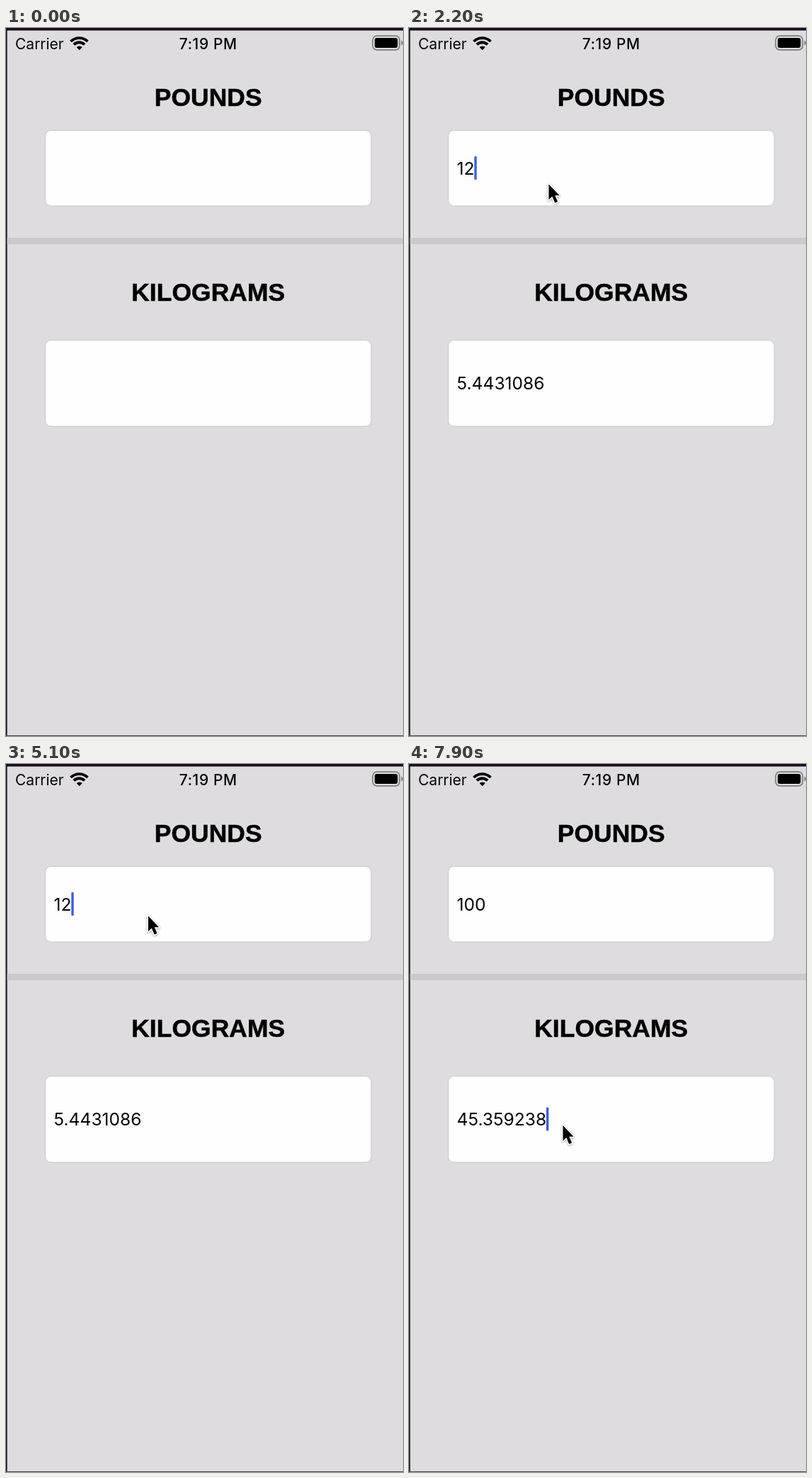
Animation, 561 px wide and 999 px high, one loop 8000 ms. Source, as an HTML page:

```html
<!DOCTYPE html>
<html lang="en">
<head>
<meta charset="utf-8">
<title>Weight converter</title>
<style>
  html, body { margin: 0; width: 100%; height: 100%; overflow: hidden; background: #dedcdf; }
  svg { display: block; width: 100vw; height: 100vh; }
  text { font-family: Inter, Roboto, sans-serif; fill: #050505; }
  .status { font-size: 21px; }
  .clock { font-weight: 500; letter-spacing: .6px; text-anchor: middle; }
  .title { font: bold 35.5px "Liberation Sans", Arial, sans-serif; text-anchor: middle; fill: #000; stroke: #000; stroke-width: .5; }
  .value { font-size: 24.6px; }
  .field { fill: #fffeff; stroke: #c9c7cb; stroke-width: 1; }
  #pointer { filter: drop-shadow(0 1.5px 1.5px rgba(0, 0, 0, .35)); }
</style>
</head>
<body>
<svg viewBox="0 0 561 999">
  <rect width="561" height="999" fill="#dedcdf"/>
  <rect width="561" height="3.5" fill="#17101b"/>
  <rect width="1.6" height="999" fill="#17101b"/>
  <rect y="998" width="561" height="1" fill="#4b484d"/>

  <text class="status" x="13" y="29.5">Carrier</text>
  <g fill="none" stroke="#000" stroke-width="3.8">
    <path d="M91.5 19A17 17 0 0 1 115.5 19M95.9 23.4A10.8 10.8 0 0 1 111.1 23.4"/>
    <path d="M103.7 31.2L99.6 27.1A5.8 5.8 0 0 1 107.8 27.1Z" fill="#000" stroke="none"/>
  </g>
  <text class="status clock" x="285.8" y="29.5">7:19 PM</text>
  <rect x="518.2" y="11.2" width="38" height="19.6" rx="5.5" fill="none" stroke="#807e81" stroke-width="1.7"/>
  <rect x="521" y="14" width="32.4" height="14" rx="3" fill="#000"/>
  <path d="M558.5 17.5Q561 18.5 561 21T558.5 24.5Z" fill="#807e81"/>

  <text class="title" x="285.7" y="109.5">POUNDS</text>
  <rect class="field" x="55.5" y="144.5" width="460.5" height="106.5" rx="8"/>
  <rect x="1.6" y="296" width="560" height="9" fill="#cbc9cc"/>
  <text class="title" x="285.7" y="384.5">KILOGRAMS</text>
  <rect class="field" x="55.5" y="440.5" width="460.5" height="121.5" rx="8"/>

  <text class="value" id="pounds" x="67.6" y="206.8"/>
  <text class="value" id="kilos" x="67.6" y="510.3"/>
  <rect id="caret" width="3.4" height="33" rx="1" fill="#3a5fe0"/>
  <g id="pointer">
    <path transform="translate(1 2.5) scale(.97)" d="M0 0V22.5L5 17.8L9 27L13 25.3L9.1 16.3H15.6Z"
      fill="#000" stroke="#fff" stroke-width="3" stroke-linejoin="round" paint-order="stroke"/>
  </g>
</svg>
<script>
const LOOP = 8000, STEP = 100;
const POUNDS_FOCUS = 1200, KILOS_FOCUS = 7800;
const POUNDS_PER_KILO = Math.fround(2.2046226);
const [pounds, kilos, caret, pointer] =
  ['pounds', 'kilos', 'caret', 'pointer'].map(id => document.getElementById(id));

const clamp = v => Math.min(1, Math.max(0, v));
const linear = k => k;
const easeOut = k => 1 - (1 - k) ** 3;
const easeInOut = k => k < .5 ? 4 * k ** 3 : 1 - 4 * (1 - k) ** 3;

// Bursts of evenly spaced keys; "<" is backspace.
const presses = [
  { at: 1600, gap: 550, keys: '123' },
  { at: 3000, gap: 400, keys: '45' },
  { at: 4600, gap: 175, keys: '<<<<<' },
  { at: 6000, gap: 100, keys: '100' }
].flatMap(({ at, gap, keys }) => [...keys].map((key, i) => ({ key, time: at + i * gap })));

const enter = { time: 100, x: 334, y: 596 };
const moves = [
  { from: 100, to: 200, x: 284, y: 431, ease: linear },
  { from: 300, to: 800, x: 196.5, y: 218, ease: easeOut },
  { from: 4200, to: 4400, x: 200, y: 212, ease: linear },
  { from: 6400, to: 7050, x: 127.5, y: 658.5, ease: easeInOut },
  { from: 7050, to: 7500, x: 228, y: 507, ease: easeInOut },
  { from: 7500, to: 7900, x: 216.5, y: 507.5, ease: easeOut }
];

// Shortest decimal that survives single precision.
function shortFloat(value) {
  const single = Math.fround(value);
  for (let digits = 1; digits < 10; digits++) {
    const text = single.toPrecision(digits);
    if (Math.fround(+text) === single) return String(+text);
  }
}

function typed(t) {
  let entry = '', result = '', last = POUNDS_FOCUS;
  for (const { key, time } of presses) {
    if (time > t) break;
    entry = key === '<' ? entry.slice(0, -1) : entry + key;
    // An emptied entry keeps the last result.
    if (entry) result = shortFloat(entry / POUNDS_PER_KILO);
    last = time;
  }
  return { entry, result, last };
}

// Solid first, then a soft dip centred at three quarters of each second.
const blink = idle => clamp((Math.abs(idle % 1000 - 750) - 50) / 200);

function placeCaret(t, last) {
  const inKilos = t >= KILOS_FOCUS;
  const focus = inKilos ? KILOS_FOCUS : POUNDS_FOCUS;
  const field = inKilos ? kilos : pounds;
  const width = field.textContent ? field.getComputedTextLength() : 0;
  caret.setAttribute('x', 67.3 + width);
  caret.setAttribute('y', inKilos ? 484.5 : 181);
  caret.setAttribute('opacity', clamp((t - focus + STEP) / 200) * blink(Math.max(0, t - Math.max(last, focus))));
}

function placePointer(t) {
  let { x, y } = enter;
  for (const move of moves) {
    const k = move.ease(clamp((t - move.from) / (move.to - move.from)));
    x += (move.x - x) * k;
    y += (move.y - y) * k;
  }
  pointer.setAttribute('visibility', t < enter.time ? 'hidden' : 'visible');
  pointer.setAttribute('transform', `translate(${x} ${y})`);
}

function draw(t) {
  const { entry, result, last } = typed(t);
  pounds.textContent = entry;
  kilos.textContent = result;
  placeCaret(t, last);
  placePointer(t);
}

const start = performance.now();
function tick() {
  const t = (performance.now() - start) % LOOP;
  draw(Math.floor(t / STEP) * STEP);
  requestAnimationFrame(tick);
}
tick();
</script>
</body>
</html>
```
